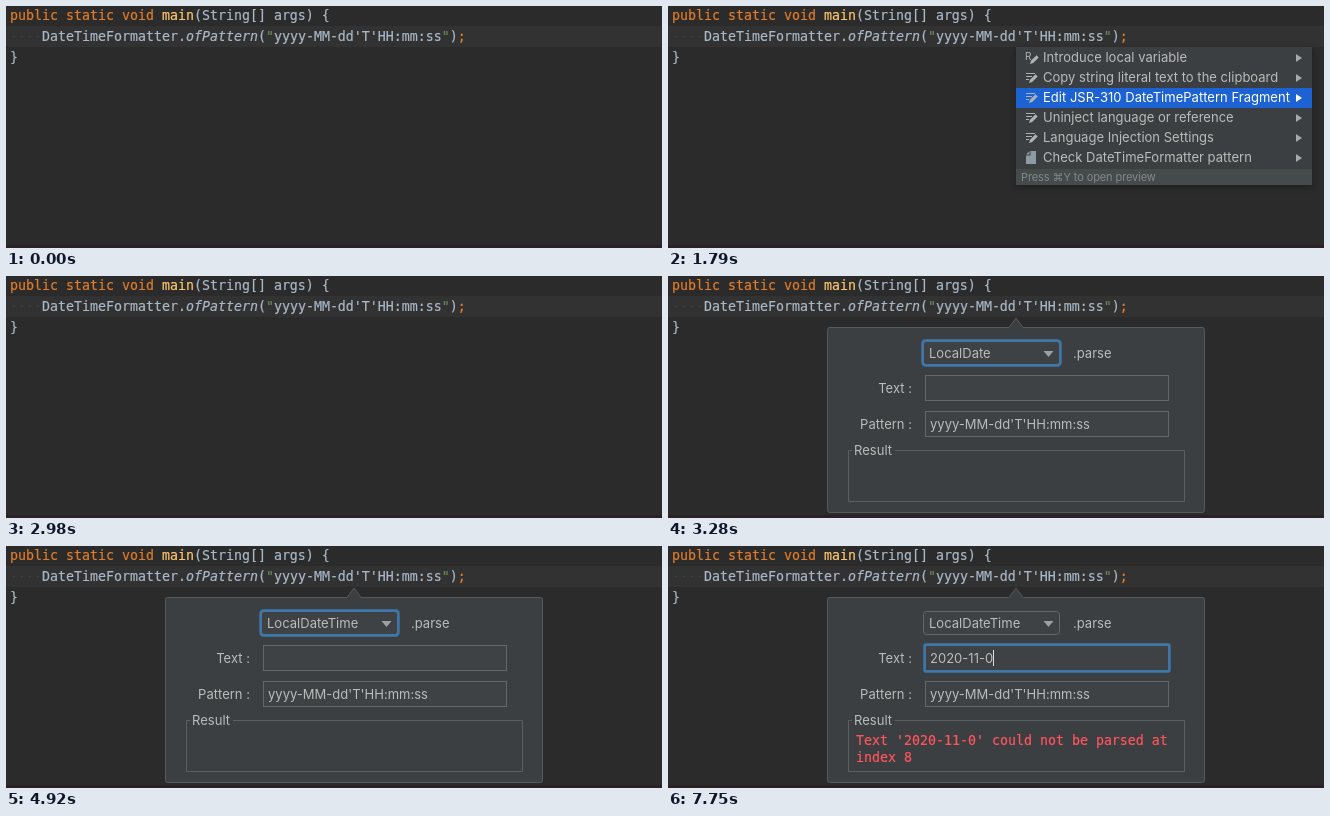
Animation of 656 by 242 pixels, one loop 8 s. Source, as an HTML page:

```html
<!DOCTYPE html>
<html lang="en">
<head>
<meta charset="utf-8">
<title>Date pattern check</title>
<style>
html, body { margin: 0; width: 100%; height: 100%; overflow: hidden; background: #2b2b2b; }
svg { display: block; width: 656px; height: 242px; }
text { font: 13px Inter, Roboto, sans-serif; letter-spacing: .02px; fill: #bbb; white-space: pre; }
.code, .code tspan { font-family: "DejaVu Sans Mono", monospace; font-size: 13.29px; letter-spacing: 0; }
.code { fill: #a9b7c6; stroke: #a9b7c6; stroke-width: .2; }
.kw { fill: #e07c2a; stroke: #e07c2a; }
.fn { fill: #ffc66d; stroke: #ffc66d; }
.str { fill: #6a8759; stroke: #6a8759; }
.it { font-style: italic; }
.err { fill: #ff555f; stroke: #ff555f; }
.hint { font-size: 11px; letter-spacing: -.1px; fill: #85888a; }
.box { fill: #3e4244; stroke: #646668; }
.ring { fill: none; stroke: #3b78b0; stroke-width: 2.4; }
.arrow { fill: #a6a8aa; }
.on text { fill: #fff; }
.on .arrow { fill: #fff; }
.shade { filter: drop-shadow(0 2px 3px rgba(0, 0, 0, .3)); }
</style>
</head>
<body>
<svg viewBox="0 0 656 242">
  <rect width="656" height="242" fill="#2b2b2b"/>
  <rect y="20" width="656" height="21" fill="#323232"/>
  <rect y="239" width="656" height="3" fill="#2a2127"/>
  <path d="M7.5 30.5h1m7 0h1m7 0h1m7 0h1" stroke="#4a4f52"/>
  <text class="code" x="4" y="14"><tspan class="kw">public static void </tspan><tspan class="fn">main</tspan>(String[] args) {</text>
  <text class="code" x="36" y="35">DateTimeFormatter.<tspan class="it">ofPattern</tspan>(<tspan class="str">"</tspan>yyyy-MM-dd'T'HH:mm:ss<tspan class="str">"</tspan>)<tspan class="kw">;</tspan></text>
  <text class="code" x="4" y="56">}</text>
  <rect id="caret" x="347.5" y="22" width="2" height="17" fill="#bbb"/>

  <g id="menu">
    <rect class="shade" x="348" y="41" width="296" height="138" fill="#3c3f41"/>
    <rect x="348" y="163" width="296" height="16" fill="#454a4b"/>
    <rect id="bar" x="348" width="296" height="20" fill="#1d62d3"/>
    <g id="items"></g>
    <text class="hint" x="353" y="175">Press ⌘Y to open preview</text>
  </g>

  <g id="popup">
    <path d="M161.500 51.500H341L348 42L355 51.500H534.500q2 0 2 2V234.500q0 2-2 2H161.500q-2 0-2-2V53.500q0-2 2-2z" fill="#3c3f41" stroke="#565a5c"/>
    <rect class="box" x="255.500" y="65.500" width="136" height="23" rx="3"/>
    <rect class="ring" id="comboRing" x="254.500" y="64.500" width="138" height="25" rx="3"/>
    <text id="combo" x="261" y="82"></text>
    <path d="M375.500 75h10l-5 6z" fill="#9da0a2"/>
    <text x="405" y="82">.parse</text>
    <text x="244" y="117" text-anchor="end">Text :</text>
    <rect class="box" x="257.500" y="99.500" width="243" height="25"/>
    <rect class="ring" id="fieldRing" x="256.500" y="98.500" width="245" height="27" rx="1"/>
    <text id="typed" x="262" y="117"></text>
    <rect id="fieldCaret" y="104" width="1" height="16" fill="#ddd"/>
    <text x="244" y="153" text-anchor="end">Pattern :</text>
    <rect class="box" x="257.500" y="135.500" width="243" height="25"/>
    <text x="262" y="153">yyyy-MM-dd'T'HH:mm:ss</text>
    <path d="M184 174.500H180.500V225.500H516.500V174.500H227" fill="none" stroke="#5c5f61"/>
    <text x="186" y="179">Result</text>
    <text class="code err" id="line1" x="188" y="199"></text>
    <text class="code err" id="line2" x="188" y="216"></text>
    <g id="list">
      <rect class="shade" x="252" y="92" width="143" height="60" fill="#3c3f41"/>
      <rect id="pick" x="252" width="143" height="20" fill="#4b6eaf"/>
      <text x="261" y="107">LocalDate</text>
      <text x="261" y="127">LocalDateTime</text>
      <text x="261" y="147">LocalTime</text>
    </g>
  </g>
</svg>
<script>
const LOOP = 8000;
const LINE_CHARS = 40;
const $ = id => document.getElementById(id);
const show = (id, on) => $(id).setAttribute("visibility", on ? "inherit" : "hidden");
const within = (t, a, b) => t >= a && t < b;
const passed = (t, times) => times.filter(x => t >= x).length;

const nib = '<path d="M4 12l1-3.200L10.500 3.300l2.200 2.200L7.200 11z" fill="#afb1b3"/>';
const pencil = '<path d="M1 2.500h9M1 5.500h6M1 8.500h3" stroke="#afb1b3" stroke-width="1.200"/>' + nib;
const rename = '<text x="0" y="9" style="font-size:10px;fill:#afb1b3">R</text>' +
  '<g transform="translate(1 1)">' + nib + '</g>';
const page = '<path d="M5.500 0H11V13H1V4.500H5.500zM4.500 0V3.500H1z" fill="#8f9ba2"/>';

const labels = ["Introduce local variable", "Copy string literal text to the clipboard",
  "Edit JSR-310 DateTimePattern Fragment", "Uninject language or reference",
  "Language Injection Settings", "Check DateTimeFormatter pattern"];
const icons = [rename, pencil, pencil, pencil, pencil, page];
$("items").innerHTML = labels.map((label, i) => `<g transform="translate(0 ${42 + 20 * i})">
  <g transform="translate(357 3)">${icons[i]}</g>
  <text x="375" y="14">${label}</text>
  <path class="arrow" d="M628 6l6 4-6 4z"/></g>`).join("");
const rows = [...$("items").children];

const moves = [1640, 1790, 2080, 2230, 2530];
const keys = [5810, 5960, 6110, 6260, 6410, 7010, 7160, 7610, 7750];
const entry = "2020-11-0";
const failAt = [0, 0, 0, 4, 5, 5, 7, 8, 8];

// Greedy word wrap into two lines.
function wrap(message) {
  if (message.length <= LINE_CHARS) return [message, ""];
  const cut = message.lastIndexOf(" ", LINE_CHARS);
  return [message.slice(0, cut), message.slice(cut + 1)];
}

let shownCount = -1;
function setEntry(count) {
  if (count === shownCount) return;
  shownCount = count;
  const value = entry.slice(0, count);
  const [a, b] = count
    ? wrap(`Text '${value}' could not be parsed at index ${failAt[count - 1]}`)
    : ["", ""];
  $("typed").textContent = value;
  $("line1").textContent = a;
  $("line2").textContent = b;
  const end = count ? $("typed").getComputedTextLength() : 0;
  $("fieldCaret").setAttribute("x", Math.round(262 + end));
}

function draw(t) {
  show("caret", within(t, 450, 890) || within(t, 3130, 3280));

  show("menu", within(t, 1040, 2980));
  const row = passed(t, moves);
  $("bar").setAttribute("y", 42 + 20 * row);
  rows.forEach((g, i) => g.classList.toggle("on", i === row));

  show("popup", t >= 3130);
  const chosen = t >= 4620;
  $("combo").textContent = chosen ? "LocalDateTime" : "LocalDate";
  show("list", within(t, 4320, 4920));
  $("pick").setAttribute("y", chosen ? 112 : 92);

  const typing = t >= 5370;
  show("comboRing", !typing);
  show("fieldRing", typing);
  show("fieldCaret", typing);
  setEntry(passed(t, keys));
}

const start = performance.now();
function tick() {
  draw((performance.now() - start) % LOOP);
  requestAnimationFrame(tick);
}
tick();
</script>
</body>
</html>
```
